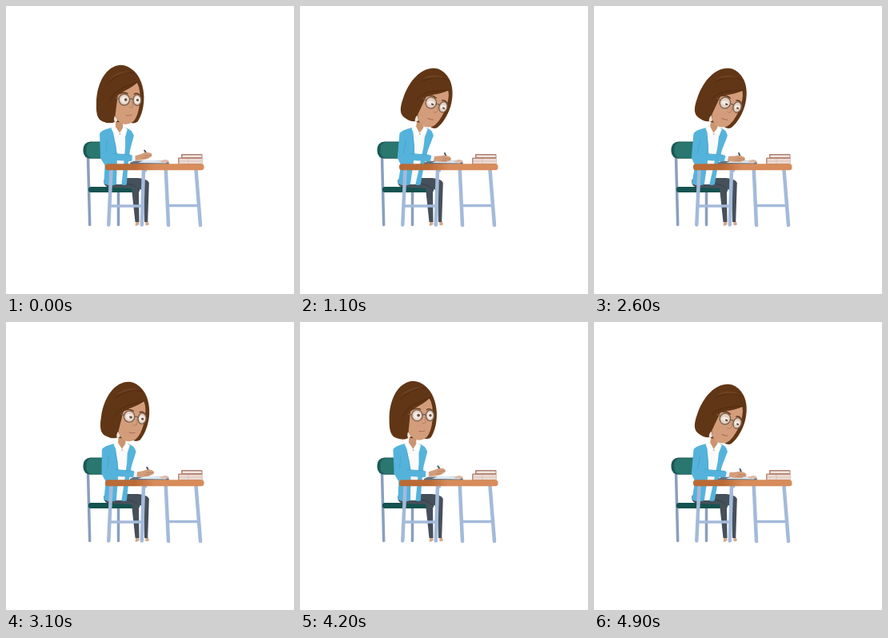
These frames come from a looping animation (360 by 360 pixels, 5 s). An HTML page:

```html
<!DOCTYPE html>
<html lang="en">
<head>
<meta charset="utf-8">
<title>Writing at a desk</title>
<style>
  html, body { margin: 0; width: 100%; height: 100%; overflow: hidden; background: #fff; }
  svg { display: block; width: 100%; height: 100%; }
  .line { fill: none; stroke-linecap: round; stroke-linejoin: round; }
</style>
</head>
<body>
<svg viewBox="0 0 360 360">
  <defs>
    <linearGradient id="wood">
      <stop offset=".3" stop-color="#b96a36"/>
      <stop offset=".5" stop-color="#d88c5b"/>
    </linearGradient>
  </defs>

  <!-- chair -->
  <g class="line" stroke="#8a9fbe" stroke-width="3.500">
    <path d="M102.500 188L104.700 273.500M140.500 232V273.500"/>
  </g>
  <rect x="96.500" y="169.500" width="46" height="21.300" rx="9" fill="#1c5854"/>
  <rect x="100.500" y="170.500" width="42" height="19.300" rx="7" fill="#2a7770"/>
  <rect x="103" y="226" width="64" height="7" rx="3" fill="#14534f"/>

  <!-- legs -->
  <path d="M162.500 268h3.500l.5 5q-3 2.500-5 1.500zM174 268h3l2 5q-2 2-4.500 1z" fill="#d0a88f"/>
  <path d="M122.500 217Q121 226 130 227L157 228L161.500 270H166.500L166 229L172 230L173 270H177.200L178.800 221Q177 216 165 215H130Z" fill="#46505a"/>
  <path d="M150 222Q161 223 165.500 229" class="line" stroke="#363f48"/>

  <g id="torso">
    <path d="M134 153L151 153L153 200L148 223H134Z" fill="#fafafa"/>
    <path d="M137 143H146V155Q145 160 142 161Q138 158 136.500 153Z" fill="#cc9470"/>
    <path d="M132 152Q118 155 117 160L118 190L123.500 199L122.500 222Q130 226 138 223L139 186L134 158Z" fill="#55b3db"/>
    <path d="M149 152Q157 154 159.800 162L155 180L152 204L151 223Q147 225 144.500 223L147 200L149 176Z" fill="#55b3db"/>
    <path d="M131.500 153L136 150L142 159L138 165ZM147 151L151.500 154L149 163L142 159Z" fill="#fff" stroke="#e5e8ea" stroke-width=".5"/>
    <path d="M134 163Q138 175 138 186M126 168L125 184" class="line" stroke="#45a2ca" stroke-width=".8"/>
  </g>

  <!-- things on the desk -->
  <path d="M155 196L160 193.500H203L204 198H155Z" fill="#65707c"/>
  <path d="M165 196L174 192.500L202 194L200 196.500Z" fill="#dce8f2"/>
  <path d="M193 194Q198 190.500 203 193V195.500H194Z" fill="#dfb9a8"/>

  <path id="sleeve" class="line" stroke="#55b3db" stroke-width="8"/>
  <path id="fold" class="line" stroke="#45a2ca" stroke-width=".8"/>
  <g id="hand">
    <path d="M173 180.500L178 188" class="line" stroke="#47525c" stroke-width="1.900"/>
    <path d="M159 188L169 185Q174 182 180 183.500Q183.500 185 182 188L177 191Q170 193 160 193Z" fill="#d39d7b"/>
    <path d="M173 187L181 186.500M171 190L177 189" class="line" stroke="#b07b5b" stroke-width=".7"/>
    <path d="M157.500 187.500L161.500 187V193.500L157.500 194Z" fill="#eef4f8"/>
  </g>

  <!-- books -->
  <g>
    <rect x="219" y="185" width="26.500" height="5.500" rx="1" fill="#b08070"/>
    <rect x="220.500" y="186.500" width="24" height="2.500" fill="#f0e4de"/>
    <rect x="215" y="189.500" width="30.500" height="8.500" rx="1" fill="#b98b7b"/>
    <rect x="216.500" y="191" width="28.500" height="6" fill="#ecdbd3"/>
    <path d="M228 191V197M217 194H245" stroke="#d6bcb1" stroke-width=".8"/>
  </g>

  <!-- table -->
  <g class="line" stroke="#a4bada" stroke-width="4.500">
    <path d="M131.500 205L128.300 273.500M172 205L169.800 273.500M199.800 205L203 274M237.500 205L243 274"/>
    <path d="M131 250H168M203 249.500H240" stroke-width="3.500"/>
    <path d="M171 211Q171 207 175 206" stroke-width="2.500"/>
  </g>
  <rect x="124" y="197.300" width="123.500" height="7.900" rx="3.500" fill="url(#wood)"/>

  <g id="head">
    <path d="M143 73.800C125 75 113 96 112.800 122C112.300 135 114.500 142 121 144.500Q130 148 136 145L155 145.500Q160 148 164.500 144.500C169.500 137 172.300 126 172.300 114C172 100 167 88 160 81.500Q152 74 143 73.800Z" fill="#613616"/>
    <path d="M163.500 96C155 104 146 106 139.500 112L136.500 136Q138 144 146 147.500Q153 149 159 144.500Q165 138 167 122Q168.500 104 163.500 96Z" fill="#d39d7b"/>
    <path d="M136 137Q133.500 143 136.500 146L139.500 143Z" fill="#efe4de"/>
    <path d="M164.500 95C153 100 135 104 130 118M160 84Q145 80 128 96" class="line" stroke="#522b10" stroke-width="1"/>
    <path d="M128 92Q138 80 155 82Q140 85 128 92Z" fill="#6d4224"/>
    <path d="M142 109.500Q147 107 152 109.500M160 110Q163.500 108 166.500 111" class="line" stroke="#5d371e" stroke-width="1.400"/>
    <g class="line" stroke="#75604f" stroke-width="1.300">
      <ellipse cx="147.700" cy="117" rx="6.700" ry="7" fill="#e6cfc0"/>
      <ellipse cx="163.800" cy="117.500" rx="5" ry="6.700" fill="#e6cfc0"/>
      <path d="M154.400 116.500Q156.500 115 158.800 117M141 116L137 115"/>
    </g>
    <g id="eyes">
      <ellipse cx="148" cy="117" rx="4.500" ry="4" fill="#f3ece7"/>
      <ellipse cx="163.800" cy="117.500" rx="3.400" ry="4" fill="#f3ece7"/>
      <g id="pupils" fill="#6b5142"><circle cx="149.500" cy="117" r="1.900"/><circle cx="164.300" cy="117.500" r="1.700"/></g>
    </g>
    <path d="M157 119Q160 125 157 127Q155 127.500 154 126.500" class="line" stroke="#b98262" stroke-width="1"/>
    <path d="M150 136.800Q153.500 137.500 157 136.300" class="line" stroke="#a9694f" stroke-width="1"/>
  </g>
</svg>
<script>
  const LOOP = 5000, STEP = 100, CYCLE = 3700;
  const RISE = 2755, DECAY = 438, DROP = 900, DROP_TIME = 210;
  const el = id => document.getElementById(id);
  const [torso, sleeve, fold, hand, head, eyes, pupils] =
    ["torso", "sleeve", "fold", "hand", "head", "eyes", "pupils"].map(el);

  // 0 is sitting upright, 1 is bent over the page.
  function bend(p) {
    if (p >= RISE) return Math.exp((RISE - p) / DECAY);
    const rest = Math.exp((RISE - p - CYCLE) / DECAY);
    const u = Math.min(1, Math.max(0, (p - DROP) / DROP_TIME));
    const ease = u * u * (3 - 2 * u);
    return rest + (1 - rest) * ease;
  }

  function draw(t) {
    const p = t % CYCLE;
    const k = bend(p);
    const q = k * 1.12 - 0.12;
    const writing = Math.max(0, (k - 0.5) * 2);
    const scribble = 1.6 * writing * Math.sin((p - 1100) * 2 * Math.PI / 500);

    // Shear the body about the hips; tilt the head about the neck.
    torso.setAttribute("transform", `matrix(1 0 ${-0.12 * q} 1 ${26.6 * q} 0)`);
    head.setAttribute("transform", `translate(${6.3 * q} ${0.6 * q}) rotate(${18 * q} 142 150)`);

    const hx = 6.2 * q + scribble, hy = 2.5 * q;
    const ex = 122 + 5 * q, wx = 155 + hx;
    hand.setAttribute("transform", `translate(${hx} ${hy}) rotate(${13 * q} 170 189)`);
    sleeve.setAttribute("d", `M${ex} 188L${wx} ${190 + 0.3 * q}`);
    fold.setAttribute("d", `M${ex + 12} 184.500L${wx} ${186 + 0.3 * q}`);

    const open = 1 - 0.35 * Math.max(0, q);
    eyes.setAttribute("transform", `translate(0 ${118 * (1 - open)}) scale(1 ${open})`);
    pupils.setAttribute("transform", `translate(${0.5 * q} ${1.5 * q})`);
  }

  const start = performance.now();
  function frame() {
    const t = (performance.now() - start) % LOOP;
    draw(Math.floor(t / STEP) * STEP);
    requestAnimationFrame(frame);
  }
  frame();
</script>
</body>
</html>
```
